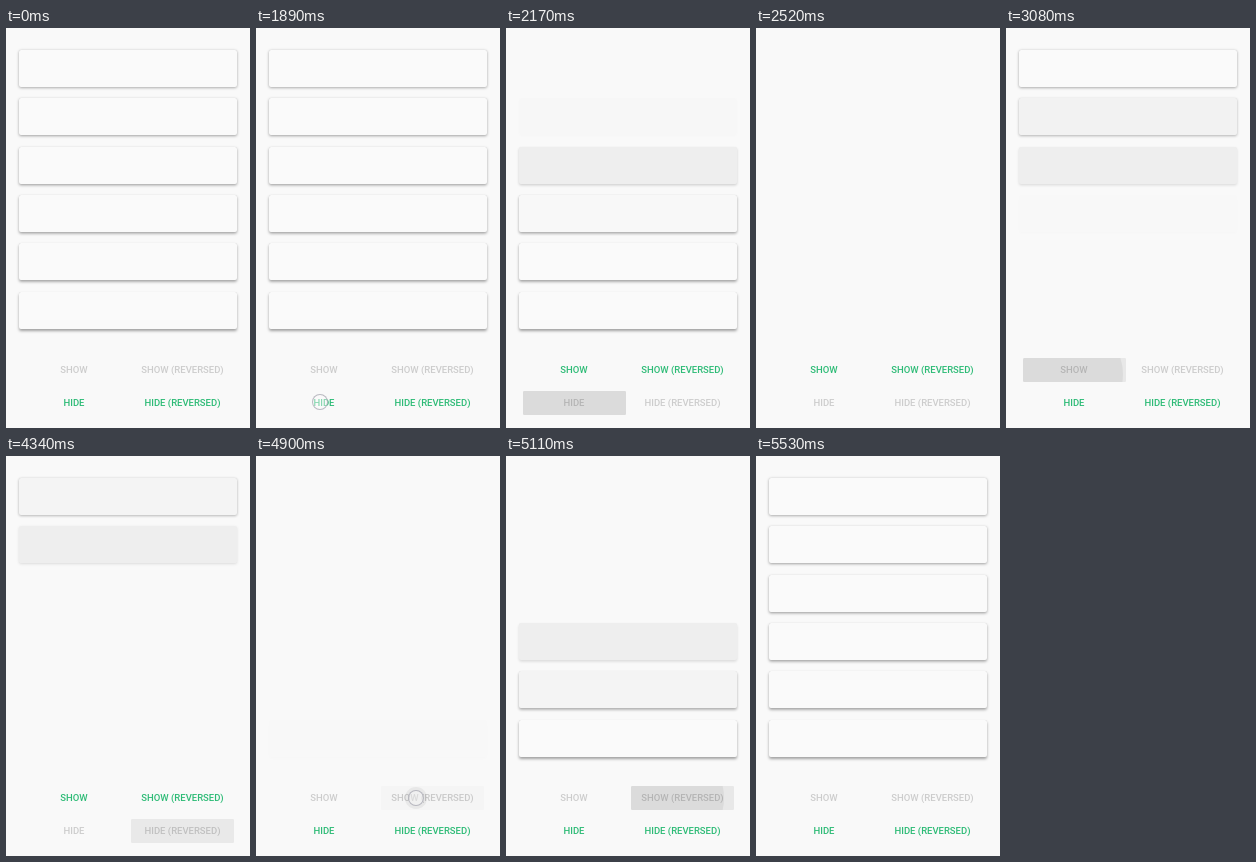
Write an HTML page that moves like this. It is 244 px wide and 400 px high and loops after 5.6 s.

```html
<!DOCTYPE html>
<html lang="en">
<head>
<meta charset="utf-8">
<title>Staggered fade</title>
<style>
html, body { margin: 0; width: 100%; height: 100%; overflow: hidden; background: #f9f9f9; }
#stage { position: relative; width: 244px; height: 400px; overflow: hidden; }
#stage div { position: absolute; }
.shade, .card { left: 13px; width: 218px; height: 37px; border-radius: 2px; }
.shade { background: rgba(0, 0, 0, .2); }
.card { background: #fafafa; }
.btn {
  width: 103px; height: 24px; overflow: hidden; border-radius: 1px;
  font: 500 9.49px/24px Roboto, Arial, sans-serif; text-align: center; white-space: nowrap;
}
.wash { inset: 0; background: rgba(0, 0, 0, .065); }
.wave { border-radius: 50%; background: rgba(0, 0, 0, .055); }
#touch {
  width: 14px; height: 14px; margin: -8px; border: 1.5px solid rgba(165, 165, 175, .75);
  border-radius: 50%; background: rgba(250, 250, 250, .45);
}
</style>
</head>
<body>
<div id="stage"></div>
<script>
const LOOP = 5600, COUNT = 6, FADE = 200;
const GREEN = '#2dbb76', GREY = 'rgba(0, 0, 0, .18)';

// tap: finger down, start: fades begin, x/y: finger position
const PHASES = [
  { tap: 1890, start: 1920, step: 75, show: false, reversed: false, btn: 2, x: 64, y: 374 },
  { tap: 2800, start: 2880, step: 60, show: true, reversed: false, btn: 0, x: 66, y: 346 },
  { tap: 3850, start: 3920, step: 75, show: false, reversed: true, btn: 3, x: 164, y: 370 },
  { tap: 4830, start: 4880, step: 75, show: true, reversed: true, btn: 1, x: 160, y: 342 }
];

const stage = document.getElementById('stage');
const clamp = v => Math.min(1, Math.max(0, v));
const ease = v => (1 - Math.cos(Math.PI * clamp(v))) / 2;

function add(parent, cls, style) {
  const el = document.createElement('div');
  el.className = cls;
  Object.assign(el.style, style);
  return parent.appendChild(el);
}

const cards = Array.from({ length: COUNT }, (_, i) => {
  const top = 22 + Math.round(i * 48.3) + 'px';
  const drop = (0.7 + i * 0.25).toFixed(2);
  const boxShadow = `0 ${drop}px 3px rgba(0, 0, 0, .36)`;
  return [add(stage, 'shade', { top, boxShadow }), add(stage, 'card', { top })];
});

const buttons = ['SHOW', 'SHOW (REVERSED)', 'HIDE', 'HIDE (REVERSED)'].map((label, i) => {
  const left = i % 2 ? 125 : 16.5, top = i < 2 ? 330 : 362.5;
  const el = add(stage, 'btn', { left: left + 'px', top: top + 'px' });
  el.textContent = label;
  return { el, left, top, wash: add(el, 'wash', {}), wave: add(el, 'wave', {}) };
});

const touch = add(stage, '', {});
touch.id = 'touch';

function drawCards(t, phase) {
  cards.forEach((pair, i) => {
    let alpha = 1;
    if (phase) {
      const rank = phase.reversed ? COUNT - 1 - i : i;
      const p = ease((t - phase.start - rank * phase.step) / FADE);
      alpha = phase.show ? p : 1 - p;
    }
    pair.forEach(el => { el.style.opacity = alpha; });
  });
}

function drawButtons(t, phase) {
  const shown = !phase || phase.show;
  buttons.forEach((b, i) => {
    b.el.style.color = (i < 2) !== shown ? GREEN : GREY;
    const age = phase && phase.btn === i ? t - phase.start : -1;
    const fade = age < 0 ? 0 : 1 - clamp((age - 300) / 260);
    b.wash.style.opacity = fade * clamp(age / 90);
    b.wave.style.opacity = fade;
    if (fade > 0) {
      const r = 6 + age * 0.226;
      Object.assign(b.wave.style, {
        left: phase.x - b.left - r + 'px', top: phase.y - b.top - r + 'px',
        width: 2 * r + 'px', height: 2 * r + 'px'
      });
    }
  });
}

function drawTouch(t) {
  const hit = PHASES.find(p => t >= p.tap && t < p.start + 30);
  touch.style.opacity = hit ? 1 : 0;
  if (hit) Object.assign(touch.style, { left: hit.x + 'px', top: hit.y + 'px' });
}

function render(t) {
  const phase = PHASES.filter(p => t >= p.start).pop();
  drawCards(t, phase);
  drawButtons(t, phase);
  drawTouch(t);
}

const begin = performance.now();
function tick() {
  render((performance.now() - begin) % LOOP);
  requestAnimationFrame(tick);
}
tick();
</script>
</body>
</html>
```
